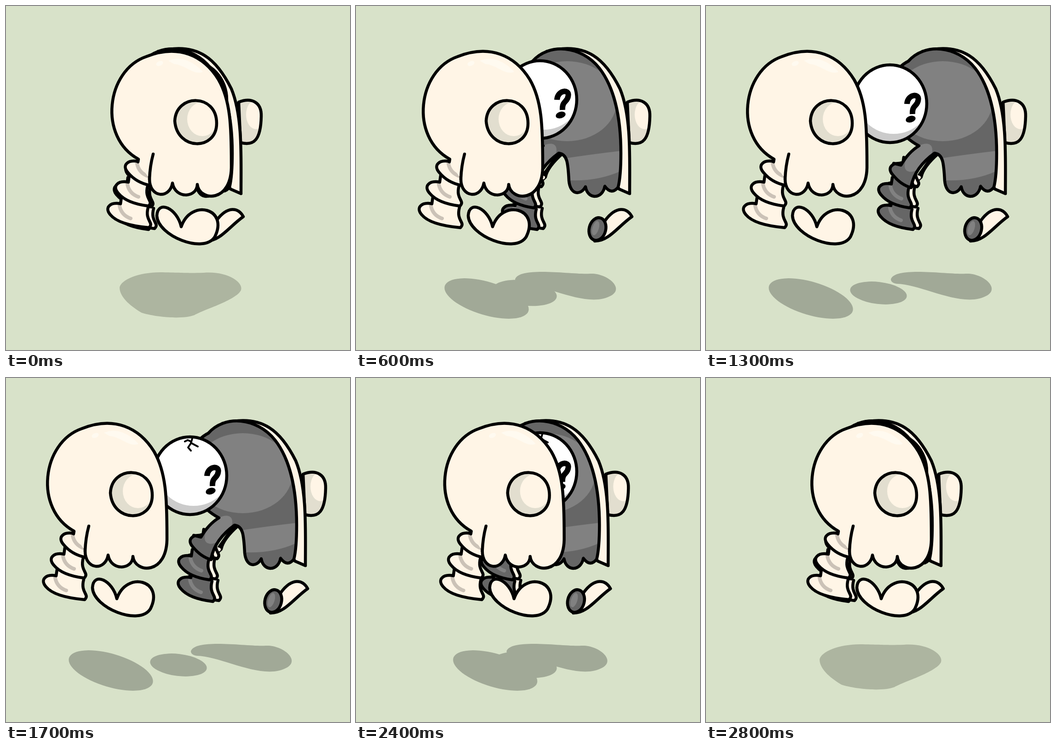
Write an HTML page with a canvas that moves like this. It is 748 px wide and 748 px high and loops after 3 s.

```html
<!DOCTYPE html>
<html lang="en">
<head>
<meta charset="utf-8">
<title>Skull</title>
<style>
  html, body { margin: 0; width: 100%; height: 100%; overflow: hidden; background: #d8e2c9; }
  canvas { display: block; width: 100vmin; height: 100vmin; }
</style>
</head>
<body>
<canvas width="748" height="748"></canvas>
<script>
const ctx = document.querySelector('canvas').getContext('2d');
const CREAM = '#fff5e6', SHADE = '#e2decf', BONE_SHADE = '#cbc2b7', SHINE = '#fffaf0';
const DARK = '#666', MID = '#818181', SHADOW = '#a1a997';

const path = d => new Path2D(d);

function oval(x, y, rx, ry, turn = 0) {
  const p = new Path2D();
  p.ellipse(x, y, rx, ry, turn, 0, 2 * Math.PI);
  return p;
}

function fill(p, color) {
  ctx.fillStyle = color;
  ctx.fill(p);
}

function line(p, width = 6.5, color = '#000') {
  ctx.lineWidth = width;
  ctx.strokeStyle = color;
  ctx.stroke(p);
}

function shape(p, color, lightColor, ...lights) {
  fill(p, color);
  ctx.save();
  ctx.clip(p);
  for (const light of lights) fill(light, lightColor);
  ctx.restore();
  line(p);
}

function shifted(x, y, draw) {
  ctx.save();
  ctx.translate(x, y);
  draw();
  ctx.restore();
}

// A flared disc whose lip curls left from the neck point and runs down to the right.
function bone(x, y, width, color, shade) {
  const disc = path(`M${x + 2} ${y - 14} l-2 14 c-22 -4 -36 8 -22 24 q18 22 ${width} 28 c12 -12 -10 -14 -2 -44`);
  fill(disc, color);
  line(path(`M${x - 2} ${y + 5} q4 20 24 27`), 8, shade);
  line(disc);
}

function drawLeft() {
  bone(109, 430, 84, CREAM, BONE_SHADE);
  bone(126, 383, 66, CREAM, BONE_SHADE);
  bone(147, 338, 48, CREAM, BONE_SHADE);
  shape(path(`M147 339 L148 333 C60 285 78 140 165 110 C235 82 290 108 322 160 C348 205 350 260 350 345
    C352 430 280 425 276 388 C275 418 228 420 222 385 C216 420 172 418 172 376`), CREAM);
  line(path('M172 376 Q173 348 180 322'));
  fill(path('M213 119 C245 105 275 128 288 143 C270 152 250 128 225 126 Z'), SHINE);
  fill(oval(194, 125, 8, 5, -0.4), SHINE);
  shape(path('M227 250 C230 190 318 190 318 255 C318 315 232 315 227 250 Z'), SHADE, CREAM, oval(287, 246, 33, 37));
  shape(path('M241 480 C232 440 190 420 188 456 C190 500 290 540 314 502 C345 440 262 418 241 480 Z'), CREAM);
}

function drawSpine(color, shade) {
  bone(402, 434, 70, color, shade);
  bone(403, 387, 62, color, shade);
  bone(428, 343, 40, color, shade);
}

function drawRight() {
  shape(path('M646 209 C675 198 696 210 695 240 C694 290 680 305 650 297 Z'), SHADE, CREAM, oval(684, 236, 22, 32));
  shape(path('M470 99 C560 75 600 120 630 180 C655 240 651 330 651 408 L628 398 Z'), CREAM);
  shape(path('M497 320 h9 Q472 350 468 372 L446 392 Z'), CREAM);
  shifted(13, -2, () => drawSpine(CREAM, CREAM));
  drawSpine(DARK, MID);
  shape(path(`M408 342 L424 346 Q440 318 463 304 C380 260 380 150 440 120 C475 80 545 85 585 135
    C620 180 632 250 632 320 Q632 370 626 394 Q612 412 597 392 C592 420 560 422 555 393
    C545 412 522 412 519 380 C517 340 515 322 497 320 Q455 350 446 392`), DARK, MID,
    oval(515, 207, 108, 87),
    path('M505 332 Q570 322 640 314 V355 Q580 385 505 378 Z'),
    oval(462, 330, 38, 20, -0.8));
  shape(path('M575 511 C605 512 625 480 656 458 C645 438 622 434 598 466 Q590 490 575 511 Z'), CREAM);
  shape(oval(581, 485, 18, 25, 0.25), DARK, MID, oval(577, 483, 7, 16, 0.3));
}

const CRACKS = ['M406 128 L402 142', 'M402 138 L395 135 L389 138', 'M402 141 L417 149 M402 142 L396 151 L402 158'];

function drawBrain(crackStage) {
  shape(oval(400, 212.5, 80, 84.5), '#cbcbcb', '#fff', oval(408, 198, 82, 80));
  ctx.lineCap = 'butt';
  line(path('M437 213 C438 192 464 189 461.5 204 C460 219 448 214 449 235'), 12);
  ctx.lineCap = 'round';
  fill(oval(445, 246, 11, 7, -0.3), '#000');
  for (const crack of CRACKS.slice(0, crackStage)) line(path(crack), 4);
}

function drawShadows(gap, raised) {
  shifted(gap, 0, () => fill(oval(228, 636, 95, 36, 0.29), SHADOW));
  shifted(437, 625, () => {
    const size = raised ? 1.14 : 1;
    ctx.scale(size, size);
    fill(oval(-62, -1, 62, 24, 0.12), SHADOW);
  });
  shifted(-gap, 0, () => fill(path(`M402 594 C412 565 530 585 565 582 C600 580 640 612 612 629
    C560 660 470 605 415 604 Q402 602 402 594 Z`), SHADOW));
}

function drawClosedShadow() {
  fill(path(`M247 612 C250 595 290 578 340 579 S395 581 430 580 C480 576 517 600 511 618
    C500 640 430 660 410 672 C380 683 320 675 295 667 C275 655 247 635 247 612 Z`), '#adb5a0');
}

// Poses are held for 100 ms: the halves part, the shell cracks, the halves close again.
function frame(now) {
  const tick = Math.floor(now % 3000 / 100);
  const step = Math.min(tick, Math.max(28 - tick, 0), 8);
  const unit = 28 / 3;
  const gap = (15 - Math.max(step, 3 * step - 9)) * unit;
  const shadowGap = (12 - Math.max(step, 3 * step - 12)) * unit;
  const resting = tick > 12 && tick < 22;
  const raised = !resting && tick % 2 === 0;
  const crackStage = Math.max(0, Math.min(3, tick - 14));

  ctx.fillStyle = '#d8e2c9';
  ctx.fillRect(0, 0, 748, 748);
  ctx.lineJoin = ctx.lineCap = 'round';

  if (step) drawShadows(shadowGap, raised);
  else drawClosedShadow();
  shifted(-gap, 0, drawRight);
  shifted(0, raised ? -9 : 0, () => drawBrain(crackStage));
  shifted(gap, 0, drawLeft);
  requestAnimationFrame(frame);
}
requestAnimationFrame(frame);
</script>
</body>
</html>
```
